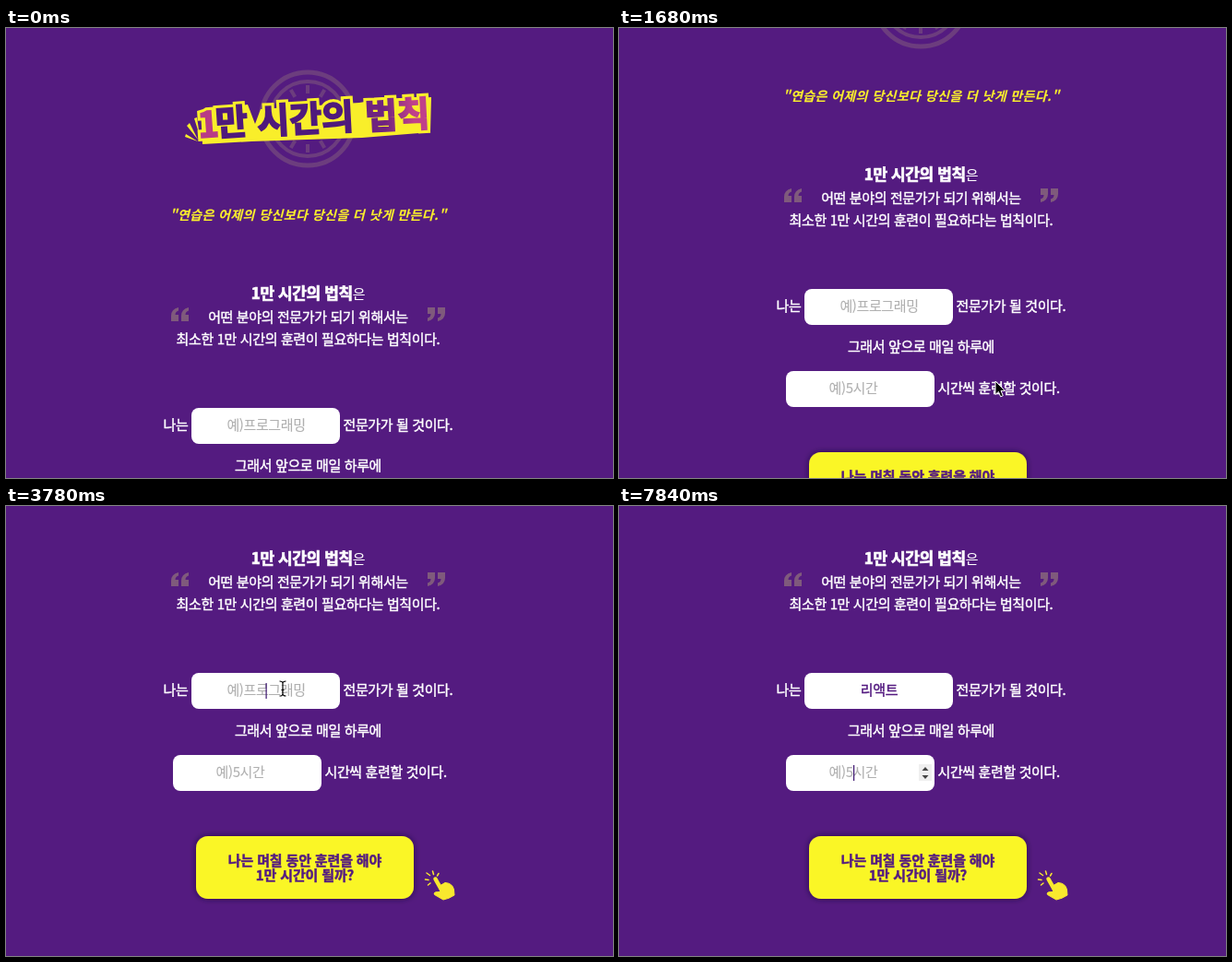
An HTML page for the animation above (8000 ms loop, 658 px wide and 488 px high).

```html
<!DOCTYPE html>
<html lang="ko">
<head>
<meta charset="utf-8">
<style>
html, body { margin: 0; height: 100%; overflow: hidden; background: #541b80; }
svg { display: block; width: 100%; height: 100%; }
text {
  font: 500 15px "Noto Sans CJK KR", "Noto Sans CJK", sans-serif; letter-spacing: -.38px;
  color: #fff; fill: currentColor; stroke: currentColor; stroke-width: .45px;
}
.mid { text-anchor: middle; }
.hint { font-weight: 400; color: #b0b0b0; stroke-width: .1px; }
.ink { color: #541b80; }
.strong { font-size: 17px; font-weight: 900; stroke-width: .7px; }
.light { stroke-width: .1px; }
.button { font-weight: 700; color: #541b80; letter-spacing: -.15px; }
.motto { font-size: 14px; font-style: italic; font-weight: 700; letter-spacing: .4px; color: #fbf02c; stroke-width: .1px; }
.logo text { font-size: 38px; font-weight: 900; letter-spacing: 0; color: #4f1a7c; stroke-width: 1.8px; }
.logo .pink { color: #b83c86; }
.logo .fade { fill: url(#fade); stroke: url(#fade); }
.logo .edge text { fill: #f9ee2a; stroke: #f9ee2a; stroke-width: 8px; }
.box { fill: #fff; }
</style>
</head>
<body>
<svg viewBox="0 0 658 488">
  <defs>
    <linearGradient id="fade">
      <stop offset=".3" stop-color="#6f2480"/>
      <stop offset=".75" stop-color="#c0408a"/>
    </linearGradient>
    <filter id="shadow" x="-10%" y="-20%" width="120%" height="140%">
      <feDropShadow dx="0" dy="0" stdDeviation="3" flood-color="#1c0630" flood-opacity=".75"/>
    </filter>
    <path id="quote" d="M8 0Q0 2 0 9V15H8V8H4.5Q4.5 4.500 8 3.500ZM19 0Q11 2 11 9V15H19V8H15.500Q15.500 4.500 19 3.500Z" fill="#7f5a7c"/>
  </defs>
  <g id="page">
    <g id="clock" fill="none" stroke="#6c3d7e">
      <circle cx="327" cy="98.500" r="50.500" stroke-width="5"/>
      <circle cx="327" cy="98.500" r="40.500" stroke-width="4"/>
    </g>
    <g class="logo">
      <path d="M211 89L262 83 270 104 276 88 383 81 389 80 461 75 460 113 386 119 266 123 213 126Z" fill="#f9ee2a"/>
      <path d="M204 98L207 97 210 117ZM196 106L199 103 208 121ZM194 118L195 115 208 123Z" fill="#f9ee2a"/>
      <g class="edge" id="edge"></g>
      <g id="words">
        <text class="pink" transform="translate(209 119) rotate(-4)">1</text>
        <text transform="translate(228 117) rotate(-4)">만</text>
        <text transform="translate(273 115) rotate(-3)">시간의</text>
        <text class="fade" transform="translate(390 110) rotate(-3)">법칙</text>
      </g>
    </g>
    <text class="motto mid" x="327.500" y="208">"연습은 어제의 당신보다 당신을 더 낫게 만든다."</text>

    <text class="mid" x="327.500" y="294"><tspan class="strong">1만 시간의 법칙</tspan><tspan class="light">은</tspan></text>
    <text class="mid" x="327.500" y="318.500">어떤 분야의 전문가가 되기 위해서는</text>
    <text class="mid" x="327.500" y="342.500">최소한 1만 시간의 훈련이 필요하다는 법칙이다.</text>
    <use href="#quote" x="179" y="303"/>
    <use href="#quote" transform="translate(476 318) rotate(180)"/>

    <text x="170.500" y="436">나는</text>
    <rect class="box" x="201" y="412" width="161" height="39" rx="8"/>
    <text class="hint mid" id="hint" x="282" y="436">예)프로그래밍</text>
    <text class="ink mid" id="typed" x="282" y="436"></text>
    <text x="365.500" y="436">전문가가 될 것이다.</text>
    <text class="mid" x="327.500" y="479.500">그래서 앞으로 매일 하루에</text>

    <rect class="box" x="181" y="501" width="161" height="39" rx="8"/>
    <text class="hint mid" x="254" y="525">예)5시간</text>
    <text x="345.500" y="525">시간씩 훈련할 것이다.</text>
    <g id="spinner">
      <rect x="325" y="511" width="14" height="18" fill="#efefef"/>
      <path d="M328.500 518L332 514 335.500 518ZM328.500 523L332 527 335.500 523Z" fill="#444"/>
    </g>
    <rect id="line" y="439.500" width="13" height="1.300" fill="#2c1250"/>
    <rect id="caret" width="1.200" height="17" fill="#3c1470"/>

    <rect x="206" y="589" width="236" height="68" rx="13" fill="#faf628" filter="url(#shadow)"/>
    <text class="button mid" x="324" y="620.500">나는 며칠 동안 훈련을 해야</text>
    <text class="button mid" x="324" y="636.500">1만 시간이 될까?</text>

    <g transform="translate(0 231)" stroke="#f9e82e" stroke-linecap="round" fill="none">
      <path d="M454.500 405L458 405.500M456 398L459.500 400.500M462.500 396L463.500 399.500M469 398.500L467.500 401M457.500 411L460 409" stroke-width="1.500"/>
      <path d="M465.500 404.500L472.500 417" stroke-width="4.500"/>
      <path d="M470 412L476 408.500Q484 409 485.500 416L486 422Q480 426 474 427L464.500 421.500Q462.500 418 470.500 418.500Z" fill="#f9e82e" stroke-linejoin="round"/>
    </g>
  </g>
  <path id="arrow" d="M0 0V14.500L3.400 11.400 5.700 16.800 8.300 15.700 6 10.400H10.500Z" fill="#000" stroke="#fff"/>
  <g id="beam" fill="none">
    <path id="bar" d="M-3.500 -8Q0 -8 0 -5.500Q0 -8 3.500 -8M0 -5.500V5.500M-3.500 8Q0 8 0 5.500Q0 8 3.500 8M-1.500 1.500H1.500" stroke="#000" stroke-width="1.200"/>
  </g>
</svg>
<script>
const LOOP = 8000, STEP = 70, SYLLABLE = 13.5;
const $ = id => document.getElementById(id);
const set = (id, attrs) => { for (const k in attrs) $(id).setAttribute(k, attrs[k]); };
const show = (id, on) => set(id, { visibility: on ? 'visible' : 'hidden' });
const ramp = (t, from, to) => Math.min(1, Math.max(0, (t - from) / (to - from)));
const smooth = p => p * p * (3 - 2 * p);
const at = (list, t) => list.filter(([start]) => start <= t).pop()[1];

const typing = [[0, ''], [4830, 'ㄹ'], [5040, '리'], [5530, ''], [6090, 'ㄹ'], [6230, '리'],
  [6440, '리애'], [6510, '리액'], [7000, '리액ㅌ'], [7140, '리액트']];
const blink = [[0, 0], [3640, 1], [4130, 0], [4690, 1], [5390, 0], [5530, 1], [7630, 0], [7770, 1]];

// Yellow rim behind the title letters
for (const word of $('words').children) {
  const rim = word.cloneNode(true);
  rim.removeAttribute('class');
  $('edge').append(rim);
}

for (let a = 0; a < 360; a += 30) {
  const tick = document.createElementNS('http://www.w3.org/2000/svg', 'path');
  tick.setAttribute('d', 'M327 62V71');
  tick.setAttribute('stroke-width', 4);
  tick.setAttribute('transform', `rotate(${a} 327 98.5)`);
  $('clock').append(tick);
}

function draw(time) {
  const t = Math.floor(time / STEP) * STEP;
  const scroll = 129 * ramp(t, 980, 1680) ** 1.76
    + 52 * (1 - (1 - ramp(t, 1750, 2380)) ** 2)
    + 50 * ramp(t, 2590, 2800);
  set('page', { transform: `translate(0 ${-Math.round(scroll)})` });

  const text = at(typing, t), second = t >= 7770;
  const end = 282 + text.length * SYLLABLE / 2;
  $('typed').textContent = text;
  show('hint', !text);
  show('spinner', second);
  show('line', text && t < 7560);
  set('line', { x: end - SYLLABLE });
  show('caret', at(blink, t));
  set('caret', second ? { x: 254, y: 512 } : { x: end - .5, y: 423 });

  const enter = smooth(ramp(t, 70, 700)), move = smooth(ramp(t, 2940, 3780));
  const x = 420 - 12 * enter - 108 * move, y = 460 - 77 * enter - 185 * move;
  const inside = x < 361 && y < 220;
  show('arrow', t >= 70 && !inside);
  show('beam', inside && t < 4690);
  for (const id of ['arrow', 'beam']) set(id, { transform: `translate(${x} ${y})` });
}

const begin = performance.now();
(function frame() {
  draw((performance.now() - begin) % LOOP);
  requestAnimationFrame(frame);
})();
</script>
</body>
</html>
```
